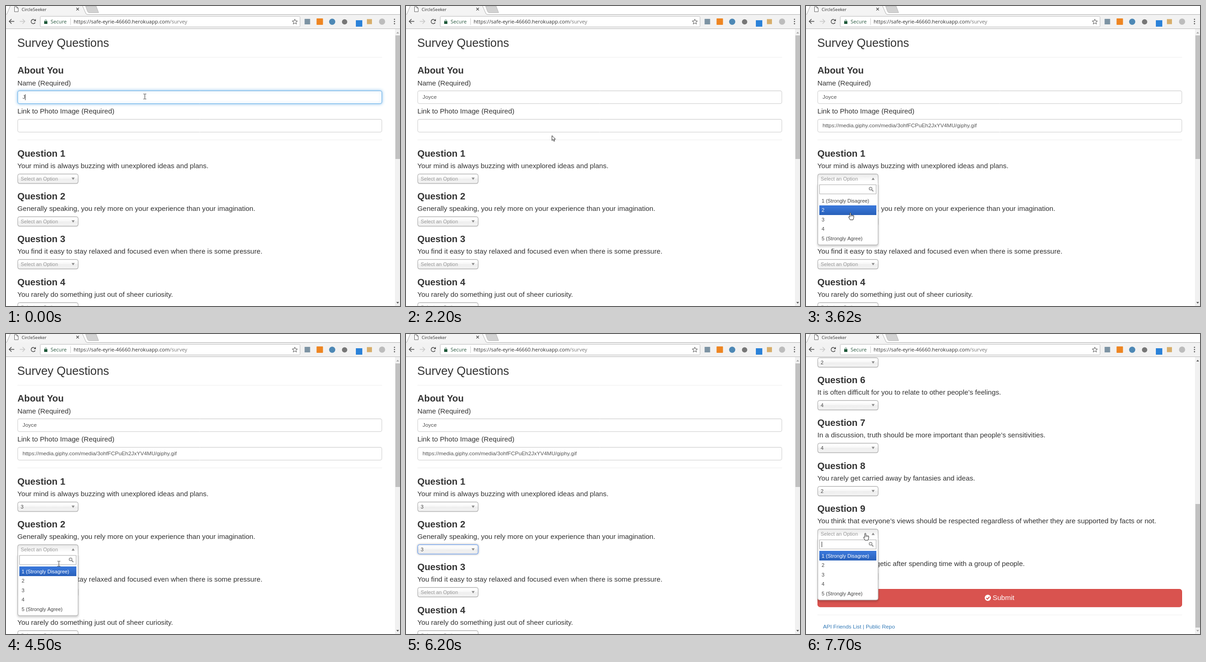
Write an HTML page with a canvas that moves like this. It is 857 by 653 pixels and loops after 8 s.

```html
<!DOCTYPE html>
<html lang="en">
<head>
<meta charset="utf-8">
<title>Survey</title>
<style>
  html, body { margin: 0; width: 100%; height: 100%; overflow: hidden; background: #fff; }
  canvas { display: block; }
</style>
</head>
<body>
<canvas id="stage" width="857" height="653"></canvas>
<script>
const ctx = document.getElementById('stage').getContext('2d');
const W = 857, H = 653, LOOP = 8000;
const SANS = '"Liberation Sans", Arial, sans-serif';
const UI = '"Open Sans", "Noto Sans", sans-serif';
const LEFT = 25, RIGHT = 818, PITCH = 93.2, SCROLL = 686.8, CUT = 6980;
const URL_TEXT = 'https://media.giphy.com/media/3ohfFCPuEh2JxYV4MU/giphy.gif';
const QUESTIONS = [
  'Your mind is always buzzing with unexplored ideas and plans.',
  'Generally speaking, you rely more on your experience than your imagination.',
  'You find it easy to stay relaxed and focused even when there is some pressure.',
  'You rarely do something just out of sheer curiosity.',
  '',
  'It is often difficult for you to relate to other people’s feelings.',
  'In a discussion, truth should be more important than people’s sensitivities.',
  'You rarely get carried away by fantasies and ideas.',
  'You think that everyone’s views should be respected regardless of whether they are supported by facts or not.',
  'You feel more energetic after spending time with a group of people.'
];
const OPTIONS = ['1 (Strongly Disagree)', '2', '3', '4', '5 (Strongly Agree)'];
const MENUS = [
  { q: 0, from: 3160, to: 3870 },
  { q: 1, from: 4060, to: 5880 },
  { q: 8, from: 7700, to: LOOP }
];
const NAME = 'Joyce', KEYS = [0, 350, 880, 970, 1060];
// Pointer path: time, x, y
const PATH = [
  [0, 302, 197], [1605, 302, 197], [1800, 790, 690], [2200, 790, 690],
  [2200, 317.5, 282], [2270, 317.5, 282],
  [2270, 309, 262], [2475, 309, 262], [2760, 140, 359.4], [2930, 140, 359.4],
  [2930, 140, 360.2], [3160, 140, 360.2], [3610, 96.5, 449.5], [3650, 96.5, 449.5],
  [3700, 97, 460], [4010, 97, 460], [4060, 106, 466], [4240, 118, 474],
  [4490, 115, 500], [4570, 115, 500], [4810, 115, 503],
  [5470, 113.5, 551], [5880, 113.5, 551], [6200, 330, 690], [7060, 470, 670],
  [7460, 129, 433], [LOOP, 129, 433]
];

function text(s, x, y, size, color = '#333', family = SANS, weight = '') {
  ctx.font = `${weight} ${size}px ${family}`;
  ctx.fillStyle = color;
  ctx.fillText(s, x, y);
}

function rect(x, y, w, h, color) {
  ctx.fillStyle = color;
  ctx.fillRect(x, y, w, h);
}

function box(x, y, w, h, r, fill, stroke) {
  ctx.beginPath();
  ctx.roundRect(x, y, w, h, r);
  if (fill) { ctx.fillStyle = fill; ctx.fill(); }
  if (stroke) { ctx.strokeStyle = stroke; ctx.stroke(); }
}

function poly(points, fill, stroke, close = true) {
  ctx.beginPath();
  points.forEach(([x, y]) => ctx.lineTo(x, y));
  if (close) ctx.closePath();
  if (fill) { ctx.fillStyle = fill; ctx.fill(); }
  if (stroke) { ctx.strokeStyle = stroke; ctx.stroke(); }
}

function disc(x, y, r, color) {
  ctx.beginPath();
  ctx.arc(x, y, r, 0, 7);
  ctx.fillStyle = color;
  ctx.fill();
}

function shadow(color, blur, dy, draw) {
  ctx.save();
  ctx.shadowColor = color;
  ctx.shadowBlur = blur;
  ctx.shadowOffsetY = dy;
  draw();
  ctx.restore();
}

function gradient(y, h, ...stops) {
  const g = ctx.createLinearGradient(0, y, 0, y + h);
  stops.forEach(([at, color]) => g.addColorStop(at, color));
  return g;
}

// dir 1 points down, -1 points up
function triangle(x, y, dir, color, w = 3.3, h = 2.5) {
  poly([[x - w, y - h * dir], [x + w, y - h * dir], [x, y + h * dir]], color);
}

function field(y, value, focus, caret) {
  const draw = () => box(LEFT + .5, y + .5, 792, 28, 3.5, '#fff', focus ? '#66afe9' : '#ccc');
  if (focus) shadow('rgba(102,175,233,.8)', 6, 0, draw);
  else draw();
  rect(LEFT + 2, y + 1, 789, 1, 'rgba(0,0,0,.04)');
  text(value, 36, y + 18, 11.8, '#555');
  if (caret) rect(Math.round(36 + ctx.measureText(value).width) - .5, y + 8, 1, 13, '#333');
}

const selectTop = (q, scroll) => Math.round(365 + PITCH * q - scroll);

function select(y, value, open, active) {
  const fill = open
    ? gradient(y, 21, [0, '#eee'], [.2, '#eee'], [.8, '#fff'])
    : gradient(y, 21, [.2, '#fff'], [.5, '#f6f6f6'], [.52, '#eee'], [1, '#f4f4f4']);
  shadow(active ? 'rgba(0,0,0,.3)' : 'rgba(0,0,0,.12)', active ? 4 : 1, active ? 0 : 1, () =>
    box(LEFT + .5, y + .5, 131.5, 20.5, open ? [4, 4, 0, 0] : 4, fill, active ? '#5897fb' : '#aaa'));
  text(value || 'Select an Option', 32, y + 15, 10.96, value ? '#444' : '#999');
  triangle(146, y + 11, open ? -1 : 1, '#888');
}

function menu(y, row, caret) {
  shadow('rgba(0,0,0,.18)', 4, 3, () =>
    box(LEFT + .5, y + 21, 131.5, 134, [0, 0, 4, 4], '#fff', '#aaa'));
  rect(LEFT + 1, y + 20, 130.5, 3, '#fff');
  box(29.5, y + 24, 123, 20, 0, '#fff', '#aaa');
  ctx.lineWidth = 1.5;
  ctx.strokeStyle = '#8a8a8a';
  ctx.beginPath();
  ctx.arc(140.5, y + 32.5, 3.1, 0, 7);
  ctx.stroke();
  ctx.lineWidth = 2;
  poly([[143, y + 35], [146.5, y + 38.5]], null, '#8a8a8a', false);
  ctx.lineWidth = 1;
  if (caret) rect(34, y + 28, 1, 12, '#222');
  OPTIONS.forEach((label, i) => {
    const top = y + 48.4 + 20.55 * i;
    if (i === row) rect(29, Math.round(top), 124, 21, gradient(top, 21, [.2, '#3875d7'], [.9, '#2a62bc']));
    text(label, 34, top + 14.2, 10.96, i === row ? '#fff' : '#444');
  });
}

function submit(y) {
  box(LEFT + .5, y + .5, 792, 38.5, 5, '#d9534f', '#d43f3a');
  disc(395.5, y + 19.2, 6.7, '#fff');
  ctx.lineWidth = 2;
  poly([[392, y + 19.5], [394.7, y + 22], [399.2, y + 17]], null, '#d9534f', false);
  ctx.lineWidth = 1;
  text('Submit', 406, y + 24.4, 15.2, '#fff');
}

function pointerAt(t) {
  let i = 0;
  while (i < PATH.length - 2 && t >= PATH[i + 1][0]) i++;
  const [t0, x0, y0] = PATH[i], [t1, x1, y1] = PATH[i + 1];
  const u = Math.floor((t - t0) / 45) * 45 / (t1 - t0);
  return { x: x0 + (x1 - x0) * u, y: y0 + (y1 - y0) * u };
}

const optionAt = (p, top) => {
  const row = Math.floor((p.y - top - 48.4) / 20.55);
  return p.x > 29 && p.x < 153 && row >= 0 && row < 5 ? row : -1;
};

function pointerKind(p, open, scroll) {
  const inside = (y, h) => p.y >= y && p.y < y + h;
  if (!scroll && (inside(184, 29) || inside(246, 29))) return ibeam;
  if (open) {
    const top = selectTop(open.q, scroll);
    if (inside(top + 24, 21)) return ibeam;
    if (optionAt(p, top) >= 0) return hand;
  }
  const overSelect = QUESTIONS.some((_, q) => inside(selectTop(q, scroll) - 5, 26));
  return overSelect && p.x > LEFT && p.x < 157 ? hand : arrow;
}

function arrow() {
  poly([[0, 0], [0, 10.8], [2.5, 8.5], [4.2, 12.5], [6, 11.7], [4.3, 8], [7.7, 8]], '#fff', '#222');
}

function ibeam() {
  rect(-.5, -5, 1, 10, '#333');
  for (const y of [-6, 5]) {
    rect(-3, y, 2.5, 1, '#333');
    rect(.5, y, 2.5, 1, '#333');
  }
}

function hand() {
  ctx.beginPath();
  ctx.moveTo(-1.2, 10);
  ctx.lineTo(-1.2, 1.5);
  ctx.quadraticCurveTo(0, -.5, 1.2, 1.5);
  ctx.lineTo(1.2, 5.5);
  for (const x of [3.2, 5.4, 7.4]) ctx.quadraticCurveTo(x - 1, 4.4 + x * .15, x, 6.2 + x * .1);
  ctx.lineTo(7.4, 11);
  ctx.lineTo(5.8, 16);
  ctx.lineTo(-.5, 16);
  ctx.lineTo(-3.8, 10.2);
  ctx.quadraticCurveTo(-3.8, 7.8, -1.2, 10);
  ctx.fillStyle = '#fff';
  ctx.fill();
  ctx.strokeStyle = '#222';
  ctx.stroke();
  for (const x of [1.2, 3.2, 5.4]) rect(x - .4, 6, .8, 2.8, '#444');
}

function chrome() {
  rect(0, 0, W, 50, '#f2f2f2');
  rect(0, 0, W, 18, '#fff');
  poly([[2, 18.5], [9, 0], [166, 0], [176, 18.5]], '#f4f4f4');
  poly([[0, 18.5], [2, 17.5], [9.5, -1]], null, '#aaa', false);
  poly([[166, -1], [174, 17], [177, 18.5], [W, 18.5]], null, '#b0b0b0', false);
  poly([[173, 0], [196, 0], [201.5, 14.5], [180, 14.5], [177.5, 12.5]], '#d2d2d2', '#b8b8b8');
  poly([[18.5, 1.5], [23.5, 1.5], [26.5, 4.5], [26.5, 12.5], [18.5, 12.5]], '#fff', '#666');
  poly([[23.5, 1.5], [23.5, 4.5], [26.5, 4.5]], null, '#666', false);
  text('CircleSeeker', 34, 10.5, 9.5, '#333', UI);
  ctx.lineWidth = 1.2;
  poly([[153, 4], [158.6, 9.6]], null, '#444', false);
  poly([[158.6, 4], [153, 9.6]], null, '#444', false);

  ctx.lineWidth = 1.6;
  for (const [x, d, color] of [[7, 1, '#505050'], [41, -1, '#c8c8c8']]) {
    poly([[x, 33.5], [x + 11 * d, 33.5]], null, color, false);
    poly([[x + 5 * d, 28.5], [x, 33.5], [x + 5 * d, 38.5]], null, color, false);
  }
  ctx.strokeStyle = '#505050';
  ctx.beginPath();
  ctx.arc(59.3, 33.8, 4.6, .5, 5.4);
  ctx.stroke();
  poly([[65, 28], [65, 33], [60, 33]], '#505050');
  ctx.lineWidth = 1;

  box(74.5, 22.5, 565, 23, 2, '#fff', '#bdbdbd');
  rect(83, 33, 7, 6, '#1f5a3a');
  ctx.strokeStyle = '#1f5a3a';
  ctx.beginPath();
  ctx.arc(86.5, 32.5, 2.2, Math.PI, 0);
  ctx.stroke();
  text('Secure', 97, 38, 11.1, '#2c5a42', UI);
  rect(140, 27, 1, 14, '#ccc');
  const host = 'https://safe-eyrie-46660.herokuapp.com';
  text(host, 147, 38, 11.17, '#333', UI);
  text('/survey', 147 + ctx.measureText(host).width, 38, 11.17, '#777', UI);
  const star = Array.from({ length: 10 }, (_, i) => {
    const a = i * Math.PI / 5 - Math.PI / 2, r = i % 2 ? 2.6 : 6;
    return [628.3 + r * Math.cos(a), 34.5 + r * Math.sin(a)];
  });
  poly(star, null, '#505050');

  box(649.5, 28, 12, 12, 0, '#7d93a3');
  box(675.5, 27, 14, 14, 1, '#ee8522');
  disc(709.5, 34.3, 6.7, '#4d88b5');
  disc(736.5, 34.5, 5.8, '#777');
  box(761, 31, 14, 14, 0, '#2b82d9');
  box(785, 28.5, 11, 11, 0, '#d8ae6a');
  disc(818, 34, 6.7, '#bcbcbc');
  for (const y of [29, 33.8, 38.6]) disc(845, y, 1.3, '#505050');
  rect(0, 49, W, 1, '#b8b8b8');
}

function scrollbar(atEnd) {
  rect(846, 50, 11, H - 50, '#f1f1f1');
  rect(847, atEnd ? 370 : 64, 10, 269, '#c1c1c1');
  triangle(852, 58, -1, atEnd ? '#505050' : '#a3a3a3', 3, 1.7);
  triangle(852, 646, 1, atEnd ? '#a3a3a3' : '#505050', 3, 1.7);
}

function answers(t) {
  if (t >= CUT) return ['3', '3', '', '', '2', '4', '4', '2'];
  return [t >= 3870 ? '3' : '', t >= 5880 ? '3' : ''];
}

function page(t, scroll, open, pointer) {
  if (!scroll) {
    text('Survey Questions', LEFT - .5, 89, 25.3);
    rect(LEFT, 111, 793, 1, '#eee');
    text('About You', LEFT, 147, 20.2, '#333', SANS, 'bold');
    text('Name (Required)', LEFT - .3, 172.5, 15.2);
    const typed = NAME.slice(0, KEYS.filter(k => t >= k).length);
    const naming = t < 2200;
    field(184, typed, naming, naming && (t < 1250 || t >= 1650));
    text('Link to Photo Image (Required)', LEFT - .3, 234, 15.2);
    const linking = t >= 2270 && t < 3160;
    field(246, t >= 2270 ? URL_TEXT : '', linking, linking && t < 2640);
    rect(LEFT, 291, 793, 1, '#eee');
  }
  const values = answers(t);
  const active = t >= 3870 && t < 4060 ? 0 : t >= 5880 && t < CUT ? 1 : -1;
  QUESTIONS.forEach((question, q) => {
    const top = selectTop(q, scroll);
    if (top < 0 || top > H) return;
    text(`Question ${q + 1}`, LEFT - .3, top - 37, 20.2, '#333', SANS, 'bold');
    text(question, LEFT - .3, top - 12.2, 15.2);
    select(top, values[q], open && open.q === q, active === q);
  });
  if (scroll) {
    submit(555);
    rect(LEFT, 611, 793, 1, '#eee');
    text('API Friends List | Public Repo', 37, 641, 11.8, '#337ab7');
  }
  if (open) {
    const top = selectTop(open.q, scroll);
    menu(top, Math.max(0, optionAt(pointer, top)), (t - open.from) % 1000 < 400);
  }
}

function render(t) {
  const scroll = t >= CUT ? SCROLL : 0;
  const open = MENUS.find(m => t >= m.from && t < m.to);
  const pointer = pointerAt(t);
  ctx.lineWidth = 1;
  rect(0, 0, W, H, '#fff');
  page(t, scroll, open, pointer);
  scrollbar(scroll > 0);
  chrome();
  ctx.save();
  ctx.translate(pointer.x, pointer.y);
  pointerKind(pointer, open, scroll)();
  ctx.restore();
}

const start = performance.now();
function tick() {
  render((performance.now() - start) % LOOP);
  requestAnimationFrame(tick);
}
tick();
</script>
</body>
</html>
```
